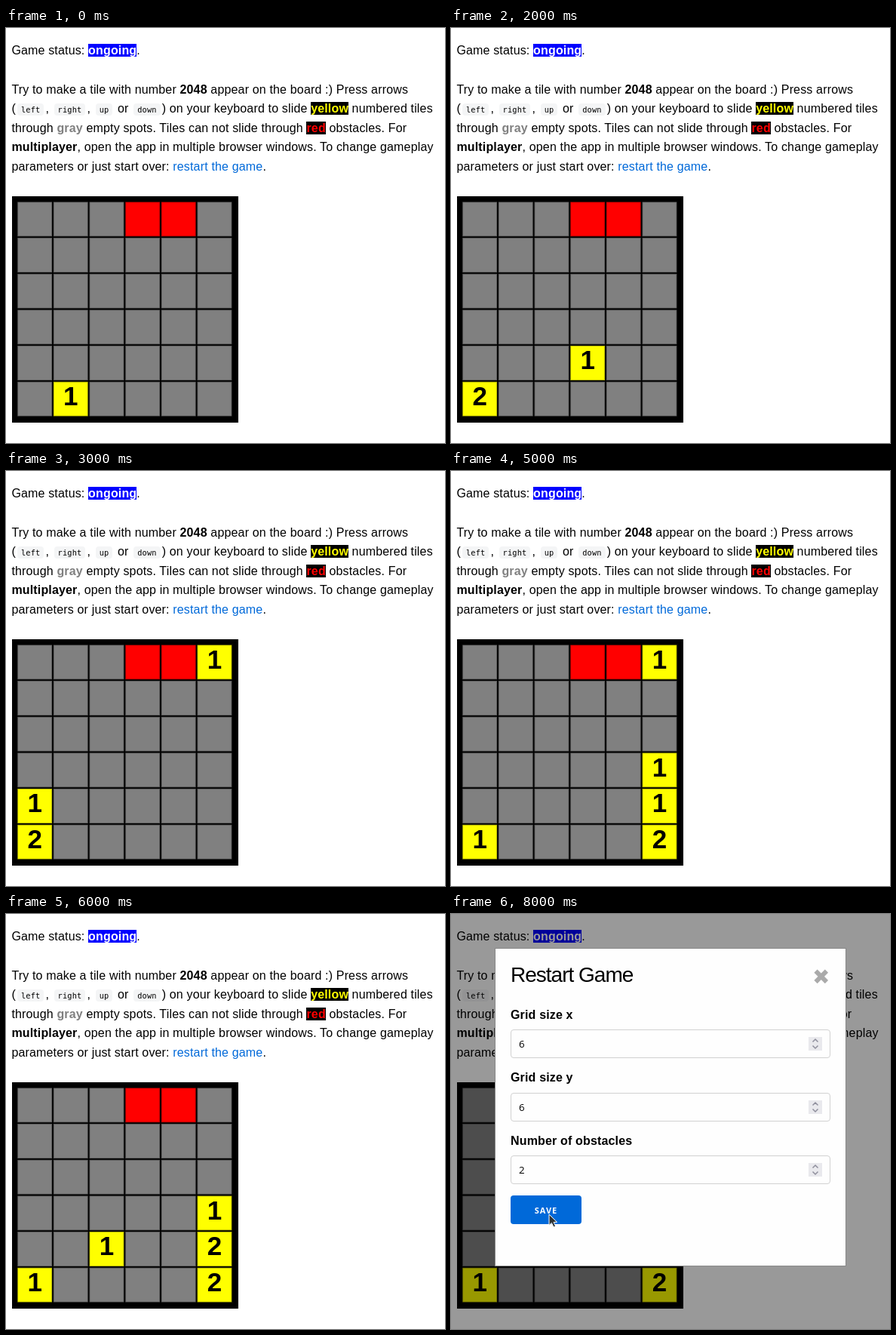
These frames come from a looping animation (582x550 px, 9 s). An HTML page:

```html
<!DOCTYPE html>
<html lang="en">
<head>
<meta charset="utf-8">
<title>Sliding tiles</title>
<style>
html, body { margin: 0; width: 100%; height: 100%; overflow: hidden; background: #fff; }
body { position: relative; font: 16px/25.6px "Liberation Sans", Arial, sans-serif; letter-spacing: .16px; color: #000; }
#intro { position: absolute; left: 7.4px; top: 17.4px; white-space: nowrap; }
code { font: 10.32px "DejaVu Sans Mono", monospace; background: #f4f5f6; border-radius: 4px; padding: 2px 5px; margin: 0 2px; }
.blue { background: #00f; color: #fff; }
.gray { color: gray; }
.yellow { background: #000; color: #ff0; }
.red { background: #000; color: red; }
.link { color: #0069d9; }
svg { position: absolute; left: 0; top: 0; }
.digit { font: bold 35px "Liberation Sans", Arial, sans-serif; letter-spacing: 0; text-anchor: middle; }

/* each step is on screen for one ninth of the loop */
.step { visibility: hidden; animation: show 9s step-end infinite; animation-delay: calc((var(--n) - 9) * 1s); }
.step.first { animation-delay: 0s; }
@keyframes show { 0% { visibility: visible; } 11.1111%, 100% { visibility: hidden; } }

#shade { position: absolute; inset: 0; background: rgba(0, 0, 0, .4); --n: 8; }
#modal { position: absolute; left: 58px; top: 45px; width: 464px; height: 420px; background: #fefefe; border: 1px solid #888; }
#modal > * { position: absolute; left: 20px; box-sizing: border-box; white-space: nowrap; }
#modal h3 { top: 17px; margin: 0; font: 28px/36px "Liberation Sans", Arial, sans-serif; letter-spacing: -1px; }
#modal .close { left: 420px; top: 16px; font: bold 28px/44px "DejaVu Sans", sans-serif; color: #aaa; }
.field { width: 424px; height: 38px; border: 1px solid #d1d1d1; border-radius: 4px; padding-left: 10px; font: 13.33px/36px "Open Sans", "Noto Sans", sans-serif; letter-spacing: 0; }
.field svg { left: 394px; top: 9px; }
.save { top: 327px; width: 94px; height: 38px; border-radius: 4px; background: #0069d9; color: #fff; text-align: center; font: bold 11px/39px "Open Sans", "Noto Sans", sans-serif; letter-spacing: 1px; }
</style>
</head>
<body>
<div id="intro">Game status: <b class="blue">ongoing</b>.<br><br>
Try to make a tile with number <b>2048</b> appear on the board :) Press arrows<br>
(<code>left</code>, <code>right</code>, <code>up</code> or <code>down</code>) on your keyboard to slide <b class="yellow">yellow</b> numbered tiles<br>
through <b class="gray">gray</b> empty spots. Tiles can not slide through <b class="red">red</b> obstacles. For<br>
<b>multiplayer</b>, open the app in multiple browser windows. To change gameplay<br>
parameters or just start over: <span class="link">restart the game</span>.</div>

<svg id="board" width="582" height="550"></svg>

<div id="shade" class="step">
  <div id="modal">
    <h3>Restart Game</h3>
    <span class="close">✖</span>
    <div class="save">SAVE</div>
  </div>
</div>
<svg id="pointers" width="582" height="550"></svg>

<script>
const SIZE = 6, SPAN = 286, PITCH = SPAN / SIZE, LEFT = 14.3, TOP = 229.5;
const board = document.getElementById("board");
const x = col => LEFT + col * PITCH;
const y = row => TOP + row * PITCH;
const cell = (row, col, fill) =>
  `<rect x="${x(col)}" y="${y(row)}" width="${PITCH}" height="${PITCH}" fill="${fill}"/>`;
const tile = ([row, col, value]) => cell(row, col, "#ff0") +
  `<text class="digit" x="${x(col) + PITCH / 2}" y="${y(row) + 32}">${value}</text>`;
const step = (n, body) => `<g class="step${n ? "" : " first"}" style="--n:${n}">${body}</g>`;

// [row, column, value] of every tile after each move
const last = [[3, 5, 1], [4, 5, 2], [5, 5, 2], [4, 2, 1], [5, 0, 1]];
const moves = [
  [[5, 1, 1]],
  [[5, 0, 1], [5, 3, 1]],
  [[5, 0, 2], [4, 3, 1]],
  [[5, 0, 2], [4, 0, 1], [0, 5, 1]],
  [[5, 5, 2], [4, 5, 1], [0, 5, 1], [3, 2, 1]],
  [[5, 5, 2], [4, 5, 1], [0, 5, 1], [3, 5, 1], [5, 0, 1]],
  last, last, last
];

let lines = "";
for (let i = 0; i <= SIZE; i++)
  lines += `M${x(i)} ${TOP}v${SPAN}M${LEFT} ${y(i)}h${SPAN}`;

board.innerHTML =
  `<rect x="8" y="223" width="300" height="300"/>` +
  `<rect x="${LEFT}" y="${TOP}" width="${SPAN}" height="${SPAN}" fill="gray"/>` +
  cell(0, 3, "red") + cell(0, 4, "red") +
  moves.map((tiles, n) => step(n, tiles.map(tile).join(""))).join("") +
  `<path d="${lines}" stroke="#000" stroke-width="3.6" stroke-opacity=".3"/>` +
  `<path d="${lines}" stroke="#000" stroke-width="1.8"/>`;

const pointer = (n, px, py) => step(n,
  `<path transform="translate(${px} ${py})" d="M0 0V14.5L3.4 11.4L6 17L8.6 15.8L6.1 10.4H10.6Z"
    fill="#2e3436" stroke="#fff" stroke-width="1"/>`);
document.getElementById("pointers").innerHTML = pointer(7, 297, 179) + pointer(8, 130, 398);

const field = (name, value, top) =>
  `<b style="top:${top}px">${name}</b>
  <div class="field" style="top:${top + 32.5}px">${value}<svg width="18" height="18">
    <rect width="18" height="18" fill="#e9e9ed"/>
    <path d="M5.5 6.5L9 3L12.5 6.5M5.5 11.5L9 15L12.5 11.5" fill="none" stroke="#8f8f9d" stroke-width="1.5"/>
  </svg></div>`;
document.getElementById("modal").insertAdjacentHTML("beforeend",
  field("Grid size x", 6, 74.5) + field("Grid size y", 6, 158) + field("Number of obstacles", 2, 241.5));
</script>
</body>
</html>
```
